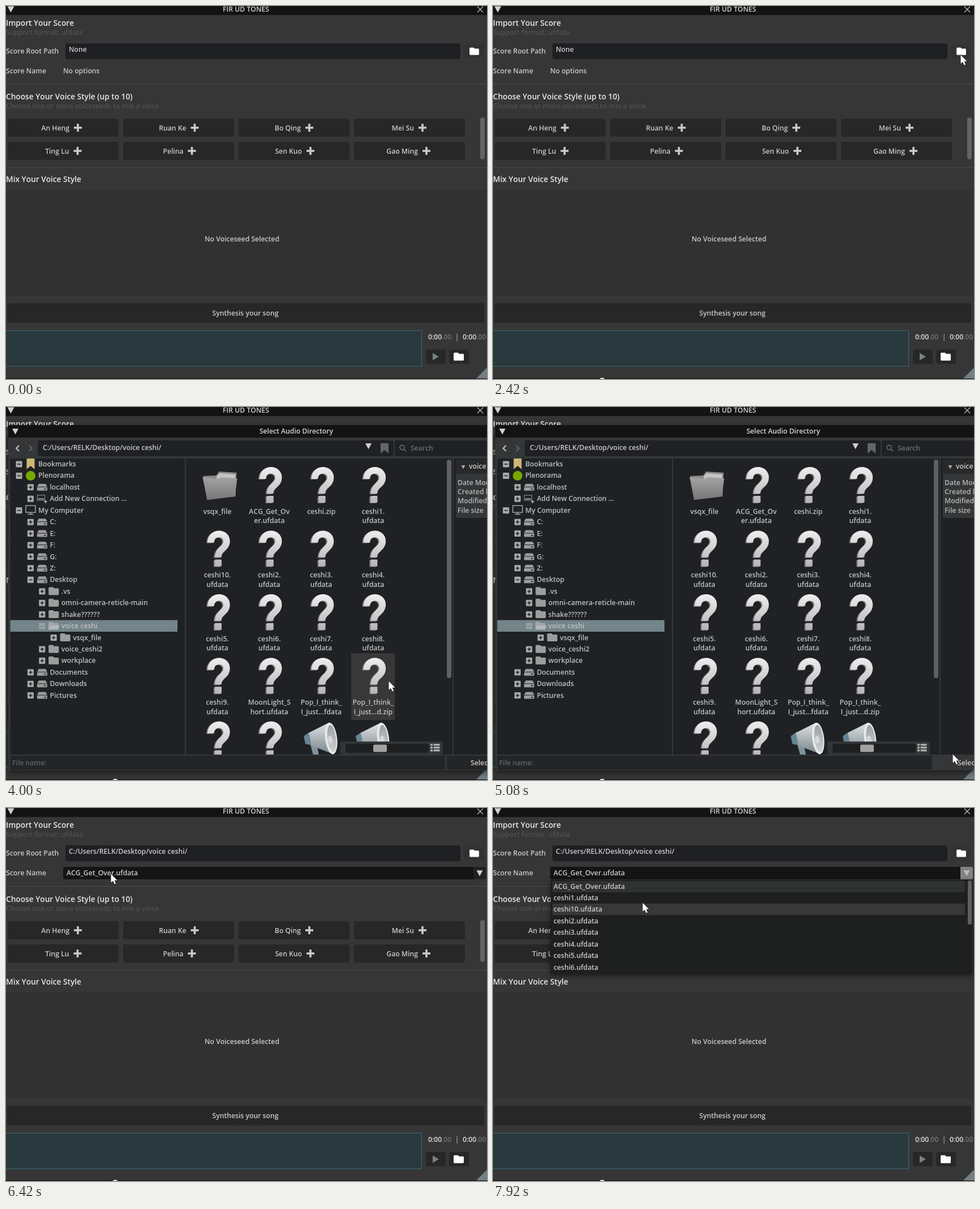
An HTML page with a canvas for the animation above (8 s loop, 850x659 px).

```html
<!DOCTYPE html>
<html lang="en">
<head>
<meta charset="utf-8">
<title>Voice mixer</title>
<style>
  html, body { margin: 0; height: 100%; overflow: hidden; background: #353535; }
  canvas { display: block; }
</style>
</head>
<body>
<canvas id="stage" width="850" height="659"></canvas>
<script>
const ctx = document.getElementById("stage").getContext("2d");
const LOOP = 8000, FPS = 12;
const DIALOG_OPEN = 31, DIALOG_CLOSE = 62, LIST_OPEN = 82;
const PATH = "C:/Users/RELK/Desktop/voice ceshi/";
const ROW = 20.43;

// Pointer keys: step, x, y
const KEYS = [
  [4, 747, 636], [11, 411, 380], [12, 411, 380], [22, 815, 100], [27, 826, 86],
  [30, 826, 86], [35, 400, 190], [38, 360, 180], [48, 676, 484], [57, 826, 620],
  [60, 826, 620], [70, 340, 381], [77, 185, 116], [80, 185, 116], [88, 257, 213],
  [90, 259, 245], [95, 264, 167]
];

// Label, centre of its plus sign
const VOICES = [
  ["An Heng", 127], ["Ruan Ke", 333.5], ["Bo Qing", 536], ["Mei Su", 736],
  ["Ting Lu", 126.5], ["Pelina", 328.5], ["Sen Kuo", 538], ["Gao Ming", 743]
];

// Level, sign, icon, label
const TREE = [
  [0, "-", "bookmark", "Bookmarks"], [0, "-", "dot", "Plenorama"],
  [1, "+", "drive", "localhost"], [1, "+", "add", "Add New Connection ..."],
  [0, "-", "monitor", "My Computer"],
  ...["C:", "E:", "F:", "G:", "Z:"].map(d => [1, "+", "drive", d]),
  [1, "-", "drive", "Desktop"], [2, "+", "folder", ".vs"],
  [2, "+", "folder", "omni-camera-reticle-main"], [2, "+", "folder", "shake??????"],
  [2, "-", "folder", "voice ceshi"], [3, "+", "folder", "vsqx_file"],
  [2, "+", "folder", "voice_ceshi2"], [2, "+", "folder", "workplace"],
  ...["Documents", "Downloads", "Pictures"].map(d => [1, "+", "drive", d])
];
const SELECTED = 14;

const FILES = [
  "vsqx_file", "ACG_Get_Ov|er.ufdata", "ceshi.zip", "ceshi1.|ufdata",
  ...[10, 2, 3, 4, 5, 6, 7, 8, 9].map(n => `ceshi${n}.|ufdata`),
  "MoonLight_S|hort.ufdata", "Pop_I_think_|I_just...fdata", "Pop_I_think_|I_just...d.zip",
  "", "", "", ""
];
const SCORES = ["ACG_Get_Over", "ceshi1", "ceshi10", "ceshi2", "ceshi3", "ceshi4", "ceshi5", "ceshi6"]
  .map(name => name + ".ufdata");

function box(x, y, w, h, color, radius = 0) {
  ctx.fillStyle = color;
  ctx.beginPath();
  ctx.roundRect(x, y, w, h, radius);
  ctx.fill();
}

function poly(color, ...points) {
  ctx.fillStyle = color;
  ctx.beginPath();
  for (let i = 0; i < points.length; i += 2) ctx.lineTo(points[i], points[i + 1]);
  ctx.closePath();
  ctx.fill();
}

function line(color, width, ...points) {
  ctx.strokeStyle = color;
  ctx.lineWidth = width;
  ctx.beginPath();
  for (let i = 0; i < points.length; i += 2) ctx.lineTo(points[i], points[i + 1]);
  ctx.stroke();
}

function oval(x, y, rx, ry, color, tilt = 0) {
  ctx.fillStyle = color;
  ctx.beginPath();
  ctx.ellipse(x, y, rx, ry, tilt, 0, 7);
  ctx.fill();
}

function text(str, x, y, { color = "#cacaca", size = 12.2, align = "left" } = {}) {
  ctx.font = `600 ${size}px "Open Sans", sans-serif`;
  ctx.textAlign = align;
  ctx.fillStyle = color;
  ctx.fillText(str, x, Math.round(y + size / 3));
}

const heading = (str, y) => text(str, 0, y, { color: "#e9e9e9", size: 13.7 });
const hint = (str, y) => text(str, 0, y, { color: "#505050" });
const down = (x, y, r, color = "#d2d2d2") => poly(color, x - r, y - r * .85, x + r, y - r * .85, x, y + r);
const plus = (x, y, r, w, color) => {
  box(x - r, y - w / 2, 2 * r, w, color);
  box(x - w / 2, y - r, w, 2 * r, color);
};
const folder = (x, y, color, s = 1) => {
  box(x - 9 * s, y - 7 * s, 9 * s, 6 * s, color, 1.5);
  box(x - 9 * s, y - 5 * s, 18 * s, 12 * s, color, 1.5);
};

function shadowed(blur, draw) {
  ctx.save();
  ctx.shadowColor = "rgba(0,0,0,.55)";
  ctx.shadowBlur = blur;
  ctx.shadowOffsetY = 3;
  draw();
  ctx.restore();
}

function gradient(y, h, from, to) {
  const g = ctx.createLinearGradient(0, y, 0, y + h);
  g.addColorStop(0, from);
  g.addColorStop(1, to);
  return g;
}

function pointerAt(step) {
  let i = 1;
  while (i < KEYS.length - 1 && step > KEYS[i][0]) i++;
  const [s0, x0, y0] = KEYS[i - 1], [s1, x1, y1] = KEYS[i];
  const u = Math.min(1, Math.max(0, (step - s0) / (s1 - s0)));
  const e = u * u * (3 - 2 * u);
  return { x: Math.round(x0 + (x1 - x0) * e), y: Math.round(y0 + (y1 - y0) * e) };
}

const inside = (p, x, y, w, h) => p.x >= x && p.x < x + w && p.y >= y && p.y < y + h;

function mainWindow(loaded, free, hot, step) {
  box(0, 0, 850, 659, "#363636");
  box(0, 0, 850, 16, "#131313");
  down(8.5, 5.5, 6);
  text("FIR UD TONES", 424, 6, { align: "center", color: "#d4d4d4" });
  line("#c4c4c4", 1.1, 833, 1, 843, 11);
  line("#c4c4c4", 1.1, 843, 1, 833, 11);

  heading("Import Your Score", 30.5);
  hint("Support format: ufdata", 47);
  text("Score Root Path", 0, 80);
  box(105, 66, 698, 28, "#1f2024", 4);
  text(loaded ? PATH : "None", 111, 77);
  box(810, 68, 35, 24, "#323232", 3);
  folder(827.5, 80, "#fff", .93);
  text("Score Name", 0, 115);
  if (loaded) {
    const lit = free && (step >= LIST_OPEN || inside(hot, 101, 104, 747, 22));
    box(101, 104, 747, 22, "#141414", 3);
    box(826, 104, 22, 22, lit ? "#838383" : "#222", [0, 3, 3, 0]);
    text(SCORES[0], 107, 115);
    down(837, 115, 5.5, lit ? "#b9b9b9" : "#d2d2d2");
  } else {
    text("No options", 101, 115);
  }

  ctx.save();
  ctx.translate(0, loaded ? 1 : 0);
  box(0, 137, 848, 1, "#4c4c4c");
  heading("Choose Your Voice Style (up to 10)", 160);
  hint("Choose one or more voiceseeds to mix a voice", 177);
  VOICES.forEach(([name, plusX], i) => {
    const x = 3 + 204 * (i % 4), y = i < 4 ? 199 : 240;
    box(x, y, 196, 32, free && inside(hot, x, y, 196, 32) ? "#3c3c3c" : "#272727", 4);
    text(name, plusX - 15, y + 16.5, { align: "right" });
    plus(plusX, y + 16, 7, 3.6, "#cacaca");
  });
  box(838, 197, 8, 74, "#636363", 4);
  box(0, 285, 848, 1, "#4c4c4c");
  heading("Mix Your Voice Style", 306);
  box(0, 325, 848, 187, "#313131");
  text("No Voiceseed Selected", 417, 412, { align: "center" });
  box(2, 525, 843, 35, "#272727", 3);
  text("Synthesis your song", 423, 543, { align: "center" });
  box(0, 573, 735, 64, "#29393e");
  ctx.strokeStyle = "#3c6972";
  ctx.lineWidth = 1;
  ctx.strokeRect(-.5, 573.5, 735, 63);
  for (const x of [746, 807]) {
    text("0:00", x, 585, { color: "#dcdcdc" });
    text(".00", x + 24, 585, { color: "#727272" });
  }
  text("|", 797, 585, { align: "center", color: "#a8a8a8" });
  box(742, 607, 35, 25, "#272727", 3);
  poly("#758387", 754, 613, 765, 619.5, 754, 626);
  box(783, 607, 35, 25, "#272727", 3);
  folder(800, 619.5, "#fff");
  ctx.restore();

  poly("#737f85", 831, 658, 850, 639, 850, 658);
  box(0, 658, 850, 1, "#0c0c0c");
}

const icons = {
  bookmark: (x, y) => poly("#cdb676", x - 7, y - 10, x + 7, y - 10, x + 7, y + 9, x, y + 3, x - 7, y + 9),
  dot: (x, y) => oval(x, y, 8.5, 8.5, "#76a800"),
  monitor(x, y) {
    ctx.strokeStyle = "#a9abab";
    ctx.lineWidth = 1.4;
    ctx.strokeRect(x - 8.5, y - 8.5, 17, 12);
    box(x - 1, y + 4, 2, 3, "#a9abab");
    box(x - 5, y + 6, 10, 1.5, "#a9abab");
  },
  drive(x, y) {
    poly("#9c9e9e", x - 6, y - 6, x + 6, y - 6, x + 9, y - 1, x - 9, y - 1);
    box(x - 9, y, 18, 6, "#9c9e9e", 1);
    box(x + 3, y + 2.5, 4, 1.5, "#222426");
  },
  add(x, y) {
    ctx.strokeStyle = "#9c9e9e";
    ctx.lineWidth = 1;
    ctx.strokeRect(x - 8.5, y - 6.5, 13, 9);
    box(x - 7, y - 1, 10, 2, "#9c9e9e");
    plus(x + 6, y + 5, 3, 1.3, "#c4c4c4");
  },
  folder: (x, y) => folder(x, y - .5, "#9c9e9e")
};

function tree() {
  TREE.forEach(([level, sign, icon, label], i) => {
    const x = 23 + 20.4 * level, y = 101 + ROW * i;
    const selected = i === SELECTED;
    if (selected) box(7.5, y - 10.5, 295.5, 20.5, "#74858a");
    box(x - 5.5, y - 5.5, 11, 11, selected ? "#98a1a3" : "#a9abab", 1);
    const ink = selected ? "#74858a" : "#222426";
    box(x - 3, y - .8, 6, 1.6, ink);
    if (sign === "+") box(x - .8, y - 3, 1.6, 6, ink);
    if (selected) {
      folder(x + 20, y - .5, "#a0a6a7");
      poly("#b4b8b8", x + 14, y - 1, x + 31, y - 1, x + 28, y + 6, x + 11, y + 6);
    } else {
      icons[icon](x + 20.5, y);
    }
    text(label, x + 34, y, { color: "#bfc1c1" });
  });
}

function bigFolder(x, y) {
  poly("#8b8b8b", x - 25, y + 24, x - 2, y + 23, x + 3, y + 16, x + 34, y + 18, x + 32, y + 60, x - 18, y + 66);
  poly("#c4c4c4", x - 1, y + 24, x + 4, y + 19, x + 32, y + 21, x + 30, y + 40, x - 1, y + 40);
  poly(gradient(y + 25, 41, "#a4a4a4", "#777"),
    x - 26, y + 26, x + 1, y + 29, x + 7, y + 26, x + 35, y + 28, x + 31, y + 60, x - 18, y + 66);
}

// Two offset layers give the mark its thickness
function question(x, y) {
  ctx.lineWidth = 11.5;
  const layer = (dx, dy, color) => {
    ctx.strokeStyle = color;
    ctx.beginPath();
    ctx.moveTo(x + dx - 12, y + dy + 29);
    ctx.bezierCurveTo(x + dx - 12, y + dy + 9, x + dx + 16, y + dy + 9, x + dx + 16, y + dy + 27);
    ctx.bezierCurveTo(x + dx + 16, y + dy + 40, x + dx + 1, y + dy + 40, x + dx + 1, y + dy + 55);
    ctx.stroke();
    box(x + dx - 5, y + dy + 59, 12, 12, color, 1);
  };
  layer(-1.5, 1, "#858585");
  layer(.5, 0, gradient(y + 8, 64, "#eee", "#b4b4b4"));
}

function megaphone(x, y) {
  poly("#668494", x - 31, y + 34, x - 21, y + 27, x - 16, y + 50, x - 28, y + 48);
  poly("#7f939d", x - 20, y + 46, x - 8, y + 48, x - 4, y + 68, x - 14, y + 68);
  poly(gradient(y + 10, 56, "#e0e3e4", "#78868c"), x - 22, y + 28, x + 14, y + 10, x + 22, y + 66, x - 17, y + 51);
  oval(x + 17.5, y + 38, 10.5, 28, "#e9eaea", -.12);
  oval(x + 18.5, y + 38, 7.5, 24, gradient(y + 14, 48, "#9da2a4", "#cdd0d1"), -.12);
  oval(x + 16, y + 40, 4, 7, "#d6d8d8", -.12);
}

function fileGrid(hot) {
  ctx.save();
  ctx.beginPath();
  ctx.rect(318, 92, 471, 522);
  ctx.clip();
  FILES.forEach((label, i) => {
    const col = i % 4, row = i >> 2;
    const x = 373.5 + 91.8 * col, y = 98 + 112.4 * row;
    if (inside(hot, x - 38.5, y, 77, 117.5)) box(Math.round(x - 38.5), Math.round(y), 77, 118, "#383838");
    if (i === 0) bigFolder(x, y);
    else if (row === 4 && col > 1) megaphone(x, y);
    else question(x, y);
    label.split("|").forEach((part, n) =>
      text(part, x, y + 87 + 16.3 * n, { align: "center", color: "#bfc1c1" }));
  });
  ctx.restore();
}

function dialog(hot) {
  shadowed(12, () => box(4, 34, 860, 608, "#343638"));
  box(4, 32, 846, 22, "#131313");
  down(16.5, 43, 5.5);
  text("Select Audio Directory", 513, 43, { align: "center", color: "#d4d4d4" });

  line("#c4c4c4", 2, 23, 68, 18, 73, 23, 78);
  line("#646667", 2, 41, 68, 46, 73, 41, 78);
  box(56, 59, 629, 28, "#1f2124", 3);
  text(PATH, 65, 72);
  down(640.5, 69, 5.5);
  poly("#636567", 662, 64, 676, 64, 676, 82, 669, 76, 662, 82);
  box(687, 59, 170, 28, "#1f2124", 3);
  ctx.strokeStyle = "#77797b";
  ctx.lineWidth = 1.4;
  ctx.beginPath();
  ctx.arc(700, 71.5, 4, 0, 7);
  ctx.stroke();
  line("#77797b", 1.6, 703, 74.5, 707, 78.5);
  text("Search", 715, 73, { color: "#6c6e70" });

  box(7.5, 91, 308.5, 523, "#1f2124");
  box(318, 91, 471, 523, "#1f2124");
  box(791, 91, 59, 523, "#1f2124");
  tree();
  fileGrid(hot);
  box(779, 93, 8, 386, "#5e6062", 4);

  box(591, 591, 181, 23, "#333537", 2);
  box(600, 595, 147, 16, "#1d1f21", 3);
  box(649, 596.5, 24, 13, "#a2a2a2", 2);
  for (let i = 0; i < 3; i++) {
    box(750, 595 + 5 * i, 4, 3.5, "#a9abab");
    box(755.5, 595 + 5 * i, 11, 3.5, "#a9abab");
  }

  box(795, 93, 60, 103, "#343638", 3);
  box(795, 93, 60, 25, "#28292b", 3);
  down(808, 106, 3.5, "#a9abab");
  text("voice ceshi", 818, 105);
  ["Date Modified", "Created by", "Modified by", "File size"].forEach((label, i) =>
    text(label, 798, 133.5 + 16.4 * i, { color: "#b6b8b8" }));

  box(7.5, 616, 768.5, 25, "#232527");
  text("File name:", 11, 629, { color: "#616365" });
  box(779, 616, 80, 25, inside(hot, 779, 616, 80, 25) ? "#343638" : "#232527");
  text("Select", 821, 629);
}

function scoreList(hot) {
  shadowed(9, () => box(102, 127, 745, 166, "#1e201f"));
  SCORES.forEach((name, i) => {
    const y = 138.5 + ROW * i, top = Math.round(y - 10);
    if (inside(hot, 105, y - 10.2, 729, ROW)) box(105, top, 729, 20, "#383838");
    else if (i === 0) box(105, top, 729, 20, "#303131");
    text(name, 107, y);
  });
  box(839, 128, 7, 78, "#606060", 3.5);
}

function pointer({ x, y }) {
  ctx.save();
  ctx.translate(x, y);
  ctx.lineJoin = "round";
  const arrow = [.5, .5, .5, 16, 4, 12.8, 6.6, 18.5, 9.2, 17.4, 6.8, 11.8, 11.5, 11.8, .5, .5];
  line("#161616", 1.4, ...arrow);
  poly("#fff", ...arrow);
  ctx.restore();
}

function draw(now) {
  const step = Math.min(95, Math.floor((now % LOOP + 4) * FPS / 1000));
  const browsing = step >= DIALOG_OPEN && step < DIALOG_CLOSE;
  const listing = step >= LIST_OPEN;
  const hot = step > 4 ? pointerAt(step - 1) : { x: -1, y: -1 }; // highlights trail the pointer by one step
  ctx.fontKerning = "none";
  mainWindow(step >= DIALOG_CLOSE, !browsing, listing ? { x: -1, y: -1 } : hot, step);
  if (browsing) dialog(hot);
  if (listing) scoreList(hot);
  if (step >= 4) {
    oval(193, 660, 4.5, 3, "#f0f0f0");
    pointer(pointerAt(step));
  }
  requestAnimationFrame(() => draw(performance.now() - start));
}

const start = performance.now();
draw(0);
</script>
</body>
</html>
```
